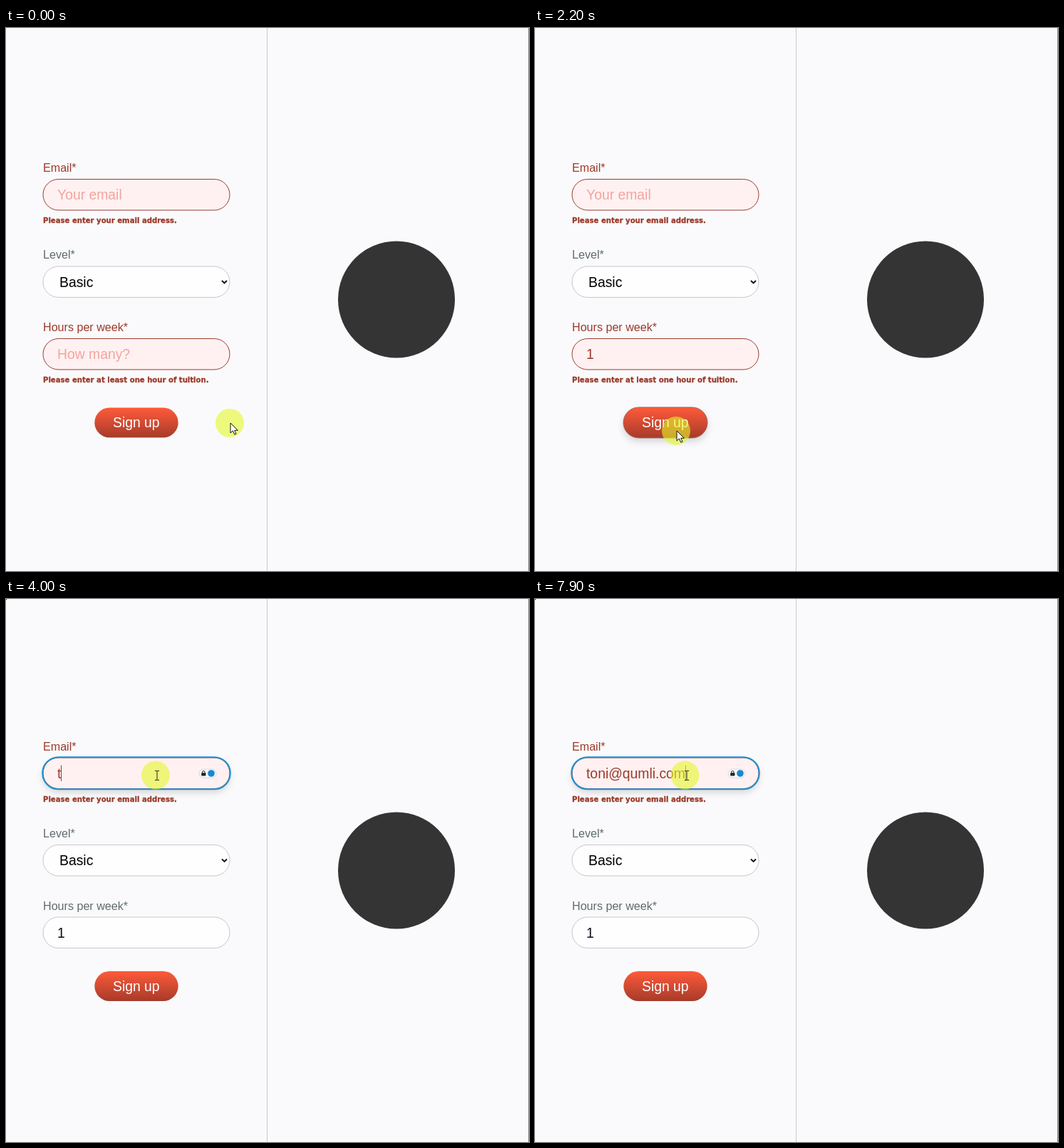
An HTML page for the animation above (8 s loop, 734 px wide and 763 px high).

```html
<!DOCTYPE html>
<html lang="en">
<head>
<meta charset="utf-8">
<title>Sign-up form</title>
<style>
  html, body { margin: 0; width: 100%; height: 100%; overflow: hidden; background: #fafafc; }
  svg { display: block; font: 19.35px "Liberation Sans", Arial, sans-serif; }
  .label { font-size: 16.13px; }
  .error { font: bold 10.1px "DejaVu Sans", sans-serif; stroke: #9b3a2a; stroke-width: .3; }
  .lifted { filter: drop-shadow(0 5px 5px rgba(0, 0, 0, .14)); }
</style>
</head>
<body>
<svg width="734" height="763" viewBox="0 0 734 763">
  <defs>
    <linearGradient id="red" x2="0" y2="1">
      <stop offset="0" stop-color="#ff5a3a"/>
      <stop offset="1" stop-color="#a63b2a"/>
    </linearGradient>
  </defs>
  <path d="M366.5 0V763" stroke="#c9c9cd"/>
  <path d="M733.5 0V763" stroke="#85858a"/>
  <circle cx="548" cy="381.5" r="82" fill="#343434"/>
  <g id="scene"></g>
</svg>
<script>
const LOOP = 8000, STEP = 100;
const RED = '#9b3a2a', GREY = '#5f6b6e', PINK = '#f3a49d';
const EMAIL = 'toni@qumli.com';
const KEY_TIMES = [4000, 4200, 4300, 4600, 4700, 4900, 5000, 5100, 5200, 5400, 5600, 5800, 5900, 6100];

// Pointer path: time, x, y
const PATH = [
  [0, 314, 555], [700, 120, 461], [1300, 120, 461], [1700, 205, 585], [2000, 198, 566],
  [2600, 198, 566], [3100, 222, 243], [3200, 222, 243], [3600, 210, 247.5], [6700, 210, 247.5],
  [6900, 203, 254], [7200, 222, 279], [7600, 227, 262], [7800, 233, 313], [7900, 210.5, 247.5], [8000, 210.5, 247.5]
];

const scene = document.getElementById('scene');
const ruler = document.createElement('canvas').getContext('2d');
ruler.font = '19.35px "Liberation Sans", Arial, sans-serif';

function pointerAt(t) {
  const i = PATH.findIndex(p => p[0] > t);
  const [t0, x0, y0] = PATH[i - 1], [t1, x1, y1] = PATH[i];
  const u = (t - t0) / (t1 - t0), k = u * u * (3 - 2 * u);
  return [x0 + (x1 - x0) * k, y0 + (y1 - y0) * k];
}

// Baselines sit on whole pixels
const text = (x, y, str, fill, cls = '') =>
  `<text x="${x}" y="${Math.round(y)}" fill="${fill}" class="${cls}">${str}</text>`;

const pill = (x, y, w, h, attrs) => `<rect x="${x}" y="${y}" width="${w}" height="${h}" rx="${h / 2}" ${attrs}/>`;

function field(y, { label, value = '', hint = '', error = '', focus, caret }) {
  const bad = error !== '';
  const caretX = Math.round(72 + ruler.measureText(value).width) + .5;
  return text(52, y - 10.5, label, bad ? RED : GREY, 'label')
    + pill(52, y, 262, 43.5, `fill="${bad ? '#fff1f2' : '#fefefe'}" stroke="${bad ? RED : '#c6c6cb'}"
        class="${focus ? 'lifted' : ''}"`)
    + (focus ? pill(51.2, y - .8, 263.6, 45.1, 'fill="none" stroke="#1b93d6" stroke-width="2"') : '')
    + text(72, y + 28.5, value || hint, value ? (bad ? RED : '#0c0d18') : PINK)
    + (caret ? `<path d="M${caretX} ${y + 10.5}v22.5" stroke="${bad ? RED : '#000'}"/>` : '')
    + (bad ? text(52, y + 61.5, error, RED, 'error') : '');
}

function select(y) {
  return text(52, y - 11, 'Level*', GREY, 'label')
    + pill(52, y, 262, 43.5, 'fill="#fefefe" stroke="#c6c6cb"')
    + text(75, y + 28.5, 'Basic', '#000')
    + `<path d="M303 ${y + 20}l3.5 3.5l3.5-3.5" fill="none" stroke="#111" stroke-width="1.9"/>`;
}

function button(y, hover) {
  const shape = hover
    ? pill(124, y - .5, 118, 43, 'fill="url(#red)" stroke="#9a6256" class="lifted"')
    : pill(124.3, y, 117.4, 42, 'fill="url(#red)"');
  return shape + text(150, y + 27.5, 'Sign up', '#fff');
}

const spinner = y => `<path d="M284.5 ${y + 18}l3.5-4l3.5 4zM284.5 ${y + 25.5}l3.5 4l3.5-4z" fill="#4a4648"/>`;

const badge = y => pill(271, y - 6, 24, 12.5, 'fill="#f4f6f8" stroke="#d9dce0"')
  + `<rect x="274.2" y="${y - .8}" width="6.2" height="4.4" rx=".8" fill="#222"/>
     <path d="M275.6 ${y}v-1.8a1.7 1.7 0 0 1 3.4 0v1.8" fill="none" stroke="#222"/>
     <circle cx="288" cy="${y}" r="4.8" fill="#1b86d0"/>`;

function pointer(x, y, beam) {
  const shape = beam
    ? `<path transform="translate(${Math.round(x + 2)} ${Math.round(y)})" fill="none" stroke="#222"
        d="M-3-6.5h2.5l.5.5l.5-.5h2.5M0-6V6M-3 6.5h2.5l.5-.5l.5.5h2.5"/>`
    : `<path transform="translate(${x + 1} ${y})" fill="#fff" stroke="#111"
        d="M0 0V14L3.4 11L5.8 16.3L8 15.3L5.7 10.3H10.3Z"/>`;
  return `<circle cx="${x}" cy="${y}" r="20" fill="#e4f828" fill-opacity=".6"/>` + shape;
}

function draw(t) {
  const sent = t >= 2400, typed = t >= 1200;
  const shift = sent ? 10.5 : 0;
  const emailY = 212.5 + shift, levelY = 335 + shift, hoursY = 436.5 + shift, buttonY = 533.5 - shift;
  const hoursFocus = t >= 900 && t < 2000, emailFocus = t >= 3500;
  const [x, y] = pointerAt(t);
  const over = (top, h, left = 52, right = 314) => x > left && x < right && y > top && y < top + h;
  const overEmail = over(emailY, 43.5), overHours = over(hoursY, 43.5);

  scene.innerHTML =
    field(emailY, {
      label: 'Email*', hint: 'Your email', error: 'Please enter your email address.',
      value: EMAIL.slice(0, KEY_TIMES.filter(k => k <= t).length),
      focus: emailFocus, caret: emailFocus && !(t >= 6600 && t < 7100)
    })
    + (t >= 3600 ? badge(emailY + 22) + '<rect width="1" height="1"/>' : '')
    + select(levelY)
    + field(hoursY, {
      label: 'Hours per week*', hint: 'How many?', value: typed ? '1' : '',
      error: sent ? '' : 'Please enter at least one hour of tuition.',
      focus: hoursFocus, caret: hoursFocus
    })
    + (overHours || hoursFocus ? spinner(hoursY) : '')
    + button(buttonY, over(buttonY, 42, 124, 242))
    + pointer(x, y, overEmail || overHours);
}

const start = performance.now();
let last = -1;
function tick() {
  const t = Math.floor((performance.now() - start) % LOOP / STEP) * STEP;
  if (t !== last) draw(last = t);
  requestAnimationFrame(tick);
}
tick();
</script>
</body>
</html>
```
